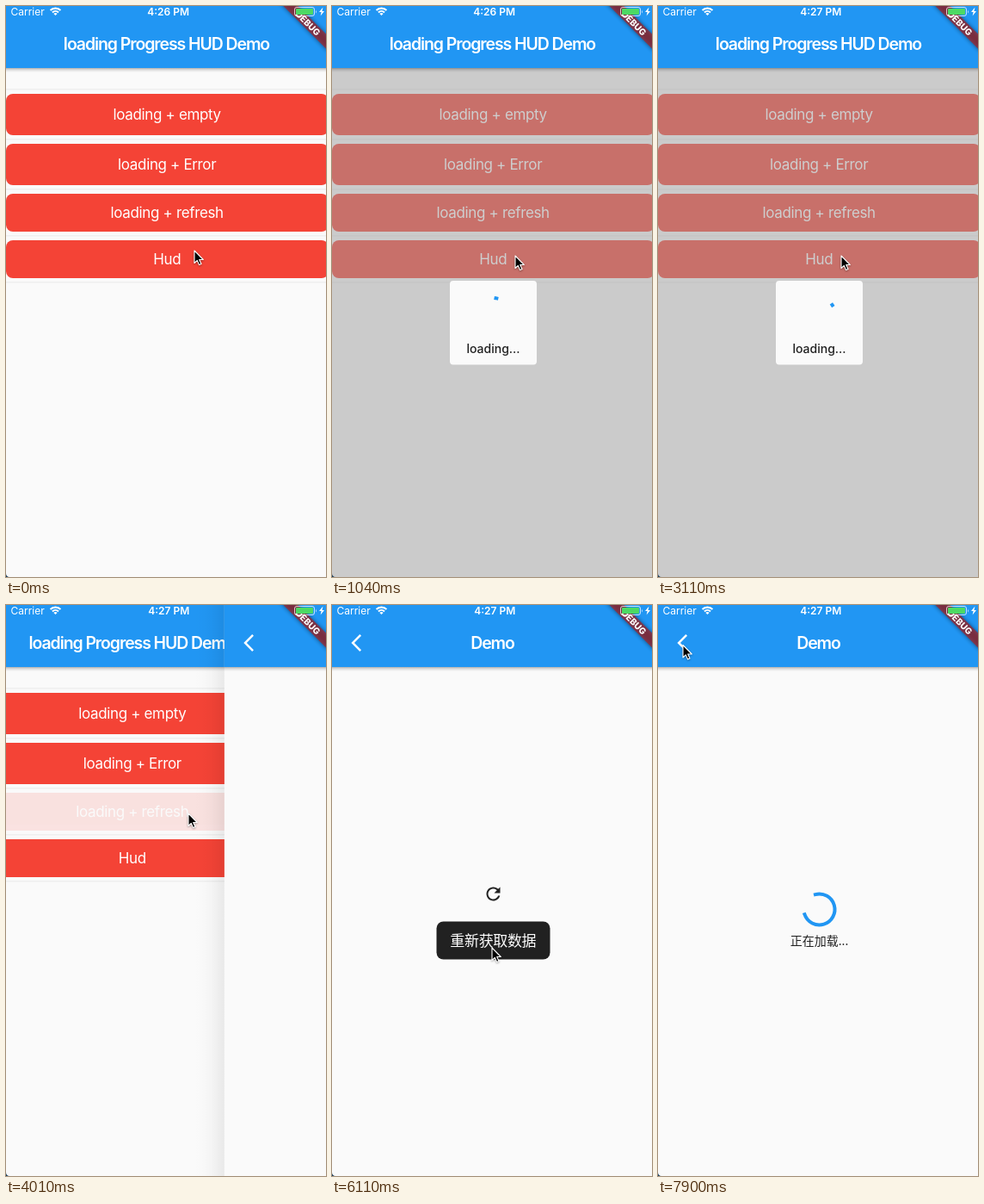
An HTML page that plays this animation: 372x663 px, repeating every 8000 ms.

```html
<!DOCTYPE html>
<html lang="zh-CN">
<head>
<meta charset="utf-8">
<title>Loading HUD demo</title>
<style>
  html, body { margin: 0; width: 100%; height: 100%; overflow: hidden; background: #fafafa; }
  svg { display: block; width: 372px; height: 663px; }
  text { font-family: Inter, "Noto Sans", sans-serif; fill: #fff; }
  .mid { text-anchor: middle; }
  .status { font-size: 12px; }
  .title { font-size: 19.5px; font-weight: 600; letter-spacing: -1.1px; }
  .label { font-size: 17px; letter-spacing: -.35px; }
  .hud { font-size: 14px; font-weight: 500; fill: #212121; }
  .cjk { font-family: "Noto Sans CJK SC", "Noto Sans CJK", sans-serif; }
  .spin { fill: none; stroke: #2196f3; stroke-width: 4; stroke-linecap: square; }
</style>
</head>
<body>
<svg viewBox="0 0 372 663">
  <defs>
    <linearGradient id="drop" x2="0" y2="1">
      <stop stop-opacity=".3"/>
      <stop offset=".4" stop-opacity=".12"/>
      <stop offset="1" stop-opacity="0"/>
    </linearGradient>
    <linearGradient id="edge">
      <stop stop-opacity="0"/>
      <stop offset=".3" stop-opacity=".016"/>
      <stop offset=".6" stop-opacity=".07"/>
      <stop offset="1" stop-opacity=".22"/>
    </linearGradient>
    <filter id="soft" x="-20%" y="-100%" width="140%" height="300%">
      <feGaussianBlur stdDeviation="2.5"/>
    </filter>
    <g id="bar">
      <rect y="72" width="375" height="5" fill="url(#drop)"/>
      <rect width="375" height="72" fill="#2196f3"/>
    </g>
  </defs>

  <g id="home">
    <rect width="375" height="663" fill="#fafafa"/>
    <g id="list"></g>
    <g id="hud">
      <rect y="72" width="375" height="591" fill="#9e9e9e" opacity=".5"/>
      <rect x="137" y="319" width="101" height="97.5" rx="4" fill="#fafafa"/>
      <path id="hudSpin" class="spin"/>
      <text class="hud mid" x="187.5" y="402.5">loading...</text>
    </g>
    <use href="#bar"/>
    <text class="title mid" x="186.5" y="51">loading Progress HUD Demo</text>
  </g>

  <g id="page">
    <rect id="pageEdge" x="-37.5" width="37.5" height="663" fill="url(#edge)"/>
    <rect width="375" height="663" fill="#fafafa"/>
    <g id="busy">
      <path id="pageSpin" class="spin"/>
      <text class="hud cjk mid" x="187.5" y="394.5" style="font-weight:400">正在加载...</text>
    </g>
    <g id="retry">
      <path transform="translate(175.5 323.5)" fill="#212121" d="M17.65 6.35C16.2 4.9 14.21 4 12 4c-4.42 0-7.99 3.58-7.99 8s3.57 8 7.99 8c3.73 0 6.84-2.55 7.73-6h-2.08c-.82 2.33-3.04 4-5.65 4-3.31 0-6-2.69-6-6s2.69-6 6-6c1.66 0 3.14.69 4.22 1.78L13 11h7V4z"/>
      <rect x="121.5" y="367.5" width="132" height="44" rx="8" fill="#212121"/>
      <text class="label cjk mid" x="187.3" y="396">重新获取数据</text>
    </g>
    <use href="#bar"/>
    <path transform="translate(22.4 32)" fill="#fff" d="M11.67 3.87L9.9 2.1 0 12l9.9 9.9 1.77-1.77L3.54 12z"/>
    <text class="title mid" x="186.5" y="51">Demo</text>
  </g>

  <g transform="translate(375 -4) rotate(45)">
    <rect x="-40" y="28" width="80" height="12" opacity=".5" filter="url(#soft)"/>
    <rect x="-40" y="28" width="80" height="12" fill="#b71c1c" fill-opacity=".63"/>
    <text class="mid" y="37.7" font-size="10.2" font-weight="800">DEBUG</text>
  </g>

  <text class="status" x="5.5" y="10.7">Carrier</text>
  <g id="wifi" fill="none" stroke="#fff" stroke-width="2.1"></g>
  <text id="clock" class="status mid" y="10.7" font-weight="600"></text>
  <rect x="335.5" y="1.5" width="23" height="10" rx="2.5" fill="none" stroke="#fff" stroke-opacity=".75"/>
  <rect x="337" y="3" width="20" height="7" rx="1" fill="#4cd964"/>
  <path d="M360 4.5q1.6 2 0 4z" fill="#fff" opacity=".75"/>
  <path d="M368.5 1.5L364 7h2.6l-1 4.5L370 6h-2.6z" fill="#fff"/>
  <path d="M0 659q.3 3.7 4 4H0z" fill="#1d3f5a"/>

  <path id="cursor" d="M0 0V14.5L3.3 11.4L5.6 16.6L8 15.6L5.7 10.5H10.3Z" stroke="#fff" stroke-width="1.1" stroke-linejoin="round" style="filter:drop-shadow(0 1px 1px rgba(0,0,0,.35))"/>
</svg>
<script>
const LOOP = 8000, TICK = 149, FIRST = 284;
const HUD_ON = 1005, HUD_OFF = 3015, PRESS = 3880, PUSH = 3970, PUSH_TIME = 380;
const FAIL = 5975, RELOAD = 6457, MINUTE = 2000, SPIN = 1008;

const $ = id => document.getElementById(id);
const clamp = v => Math.min(1, Math.max(0, v));
const show = (id, on) => $(id).setAttribute('display', on ? 'inline' : 'none');
const move = (id, x, y = 0) => $(id).setAttribute('transform', `translate(${x} ${y})`);

function bezier(x1, y1, x2, y2) {
  const at = (a, b, s) => 3 * a * s * (1 - s) ** 2 + 3 * b * s * s * (1 - s) + s ** 3;
  return x => {
    let lo = 0, hi = 1;
    for (let i = 0; i < 24; i++) {
      const m = (lo + hi) / 2;
      if (at(x1, x2, m) < x) lo = m; else hi = m;
    }
    return at(y1, y2, (lo + hi) / 2);
  };
}
const fastOut = bezier(.4, 0, .2, 1);
const slide = bezier(.35, .91, .33, .97);

// Angles in radians, clockwise from three o'clock.
function arc(cx, cy, r, from, sweep) {
  const p = a => `${cx + r * Math.cos(a)} ${cy + r * Math.sin(a)}`;
  return `M${p(from)}A${r} ${r} 0 ${sweep > Math.PI ? 1 : 0} 1 ${p(from + sweep)}`;
}

function spinner(id, cy, ms) {
  const cycle = Math.max(0, ms) / SPIN, step = Math.floor(cycle) % 5, u = cycle % 1;
  const span = 1.5 * Math.PI;
  const head = span * fastOut(clamp(u * 2)), tail = span * fastOut(clamp(u * 2 - 1));
  const from = -Math.PI / 2 + tail + Math.PI * (1.7 * u - .8 * step);
  $(id).setAttribute('d', arc(187.5, cy, 18, from, Math.max(head - tail, .01)));
}

const path = [
  [200, 219, 284], [700, 213, 290], [3500, 213, 290], [3760, 212, 242],
  [4090, 212, 242], [4460, 207, 325], [4610, 204, 338], [5200, 186, 398],
  [6650, 186, 398], [7550, 33, 54], [7800, 29, 46.5]
];
function cursorAt(t) {
  const i = path.findIndex(k => k[0] > t);
  if (i < 0) return path[path.length - 1].slice(1);
  if (i === 0) return path[0].slice(1);
  const [t0, x0, y0] = path[i - 1], [t1, x1, y1] = path[i];
  const k = (t - t0) / (t1 - t0), e = k * k * (3 - 2 * k);
  return [x0 + (x1 - x0) * e, y0 + (y1 - y0) * e];
}

const rows = [['loading + empty', 102, 48], ['loading + Error', 160, 48],
  ['loading + refresh', 218, 44], ['Hud', 272, 44]];
const line = y => `<rect y="${y}" width="375" height="1.5" fill="#efefef"/>`;
$('list').innerHTML = line(96) + rows.map(([name, y, h], i) =>
  `<g id="row${i}"><rect y="${y}" width="375" height="${h}" rx="8" fill="#f44336"/>
   <text class="label mid" x="187.2" y="${y + h / 2 + 6}">${name}</text></g>` + line(y + h + 4)).join('');

$('wifi').innerHTML = [1.5, 5, 8.4].map(r =>
  `<path d="${arc(57.5, 11, r, -.75 * Math.PI, Math.PI / 2)}" ${r < 2 ? 'stroke-width="3"' : ''}/>`).join('');

function draw(now) {
  const t = now < FIRST ? 0 : FIRST + 8 + TICK * Math.floor((now - FIRST) / TICK);

  show('hud', t >= HUD_ON && t < HUD_OFF);
  spinner('hudSpin', 357, t - HUD_ON);
  $('row2').setAttribute('opacity', t >= PRESS ? .13 : 1);

  const p = slide(clamp((t - PUSH) / PUSH_TIME));
  show('page', t >= PUSH);
  move('home', -125 * p);
  move('page', 375 * (1 - p));
  $('pageEdge').setAttribute('opacity', p);

  const failed = t >= FAIL && t < RELOAD;
  show('busy', !failed);
  show('retry', failed);
  spinner('pageSpin', 353.5, t - (t < RELOAD ? PUSH : RELOAD));

  const late = t >= MINUTE;
  $('clock').textContent = late ? '4:27 PM' : '4:26 PM';
  $('clock').setAttribute('x', late ? 189.3 : 188.7);
  move('cursor', ...cursorAt(t));
}

function loop() {
  draw(performance.now() % LOOP);
  requestAnimationFrame(loop);
}
loop();
</script>
</body>
</html>
```
